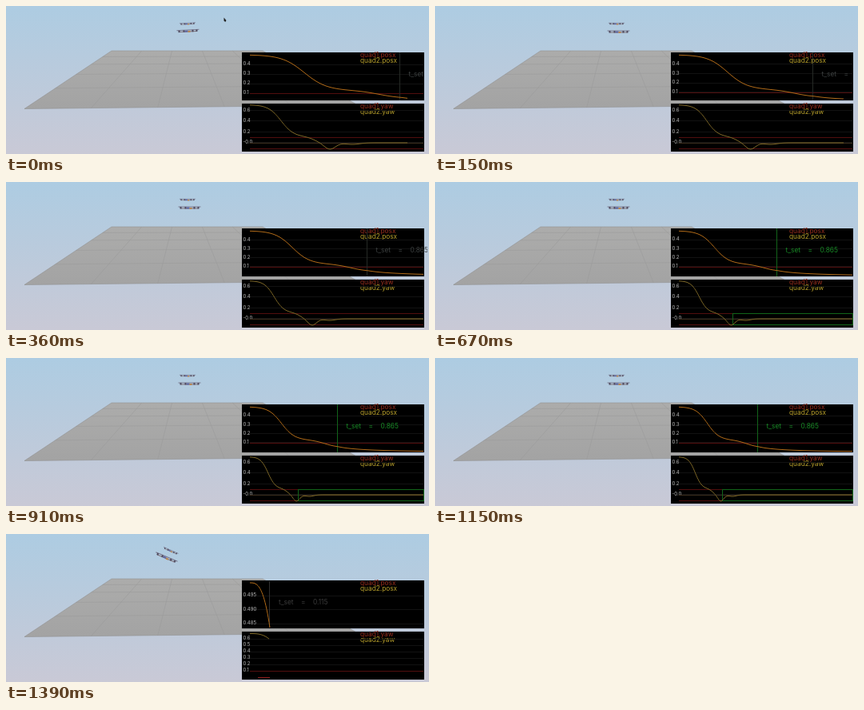
Recreate the animation shown at these times as an HTML page with a canvas. Size 529 px wide and 185 px high, loop 1.51 s.

```html
<!DOCTYPE html>
<html lang="en">
<head>
<meta charset="utf-8">
<style>
html, body { margin: 0; width: 100%; height: 100%; overflow: hidden; }
canvas { display: block; }
</style>
</head>
<body>
<canvas id="stage" width="529" height="185"></canvas>
<script>
const ctx = document.getElementById('stage').getContext('2d');
const LOOP = 1510, RESET = 1390, LEFT = 305, RIGHT = 522;
const STEPS = [0, 120, 150, 360, 670, 910, 1150, RESET];
const GREEN = '#12641a', RED = '#520e0e', ORANGE = '#b06a18', OLIVE = '#7c6626';

const drop = (u, center, width) => 1 / (1 + Math.exp((u - center) / width));
const bump = (u, center, width) => Math.exp(-(((u - center) / width) ** 2));

// Position falls in two steps and a slow tail; yaw overshoots zero twice
const position = u => .37 * drop(u, 68, 14) + .085 * drop(u, 162, 14)
  + .045 * Math.exp(-Math.max(0, u - 190) / 80);
const yaw = u => .6 * drop(u, 39, 8) + .11 * drop(u, 80, 5)
  - .12 * bump(u, 100, 10) - .03 * bump(u, 128, 13);

function trace(...points) {
  ctx.beginPath();
  points.forEach(p => ctx.lineTo(...p));
}

function line(color, x1, y1, x2, y2, width = 1) {
  ctx.strokeStyle = color;
  ctx.lineWidth = width;
  trace([x1, y1], [x2, y2]);
  ctx.stroke();
}

const across = (y, color) => line(color, LEFT, y, RIGHT, y);

function plot(color, end, yAt) {
  ctx.strokeStyle = color;
  ctx.lineWidth = 1;
  ctx.beginPath();
  for (let x = LEFT; x <= end; x++) ctx.lineTo(x, yAt(x));
  ctx.stroke();
}

function text(str, x, y, color, size = 8.3) {
  ctx.font = `${size}px Inter, sans-serif`;
  ctx.textBaseline = 'middle';
  ctx.fillStyle = color;
  ctx.fillText(str, x, y);
}

function gradient(y1, y2, from, to) {
  const fill = ctx.createLinearGradient(0, y1, 0, y2);
  fill.addColorStop(0, from);
  fill.addColorStop(1, to);
  return fill;
}

function scene() {
  ctx.fillStyle = gradient(0, 185, '#adcce2', '#c9c9d6');
  ctx.fillRect(0, 0, 529, 185);

  ctx.fillStyle = gradient(56, 128, '#acacab', '#a3a3a3');
  trace([132, 56], [321, 56], [440, 124], [23, 128.5]);
  ctx.fill();
  for (let i = 0; i <= 5; i++) {
    const s = i / 5, depth = s / (s + 2.2 * (1 - s));
    const shade = i % 5 ? '#9a9a9a' : '#909090';
    line(shade, 132 + 189 * s, 56, 23 + 417 * s, 128.5 - 4.5 * s, .6);
    line(shade, 132 - 109 * depth, 56 + 72.5 * depth, 321 + 119 * depth, 56 + 68 * depth, .6);
  }
}

function drone(x, y, angle, size) {
  ctx.save();
  ctx.translate(x, y);
  ctx.rotate(angle * Math.PI / 180);
  ctx.scale(size, size);
  line('#77738a', -14, -1, 14, -1, .9);
  line('#80727a', -11, 1, 11, 1, 1);
  ctx.fillStyle = '#514c60';
  for (const rotor of [-11, -5, 6, 11]) ctx.fillRect(rotor - 1, -1, 2, 2.5);
  ctx.fillStyle = '#5f68a4';
  ctx.fillRect(-4, -.5, 4, 2);
  ctx.fillStyle = '#b98650';
  ctx.fillRect(0, 0, 3, 2);
  ctx.restore();
}

function cursor() {
  ctx.fillStyle = '#222';
  trace([272.5, 14.5], [275.5, 18], [274.3, 20], [272.5, 18.5]);
  ctx.fill();
}

function panels() {
  ctx.fillStyle = '#000';
  ctx.fillRect(295, 58, 228, 60);
  ctx.fillRect(295, 122, 228, 60);
  ['posx', 'yaw'].forEach((name, i) => {
    const y = 62 + i * 63.5;
    text('quad1.' + name, 443, y, '#942c1c');
    text('quad2.' + name, 443, y + 6.7, '#b8a02c');
  });
}

function ticks(count, first, step, digits, y, gap) {
  for (let i = 0; i < count; i++) {
    across(Math.round(y + i * gap) + .5, '#121212');
    text((first - i * step).toFixed(digits), 296.5, y + i * gap, '#bdbdbd', 6);
  }
}

function settleTime(x, value, color) {
  text('t_set', x, 86, color);
  text('=', x + 28, 86, color);
  text(value, x + 43, 86, color);
}

function startPlots() {
  const rise = x => ((x - LEFT) / 25) ** 3;
  ticks(3, .495, .005, 3, 76.5, 17.5);
  ticks(6, .6, .1, 1, 130.5, 8);
  line('#303030', 329.5, 59, 329.5, 117);
  across(171.5, RED);
  line('#901c1c', 315, 179.5, 330, 179.5);
  plot(ORANGE, 330, x => 61 + 56 * rise(x));
  plot(OLIVE, 329, x => 124.5 + 7.5 * rise(x));
  settleTime(341, '0.115', '#3c3c3c');
}

function runPlots(t) {
  const scale = 1 / (1 + .00079 * t);
  const unit = Math.max(112, 120 - t * .022);
  const settled = t >= 670;
  const toX = u => LEFT + u * scale;
  const toU = x => (x - LEFT) / scale;
  const posY = v => 61 + (.5 - v) * unit;
  const end = Math.min(RIGHT, toX(197 + .228 * t));
  const mark = Math.round(toX(187)) + .5;
  const boxX = Math.round(toX(103)) + .5;

  ticks(4, .4, .1, 1, posY(.4) - .5, unit / 10);
  ticks(4, .6, .2, 1, 130, 13.4);
  across(Math.round(posY(.1)) + .5, RED);
  across(164.5, RED);
  across(178.5, RED);
  across(171.5, '#3a2c1c');
  line(settled ? GREEN : '#262a26', mark, 58, mark, 118);
  if (settled) {
    ctx.strokeStyle = GREEN;
    ctx.strokeRect(boxX, 164.5, RIGHT + .5 - boxX, 14);
  }
  plot(ORANGE, end, x => posY(position(toU(x))));
  plot(OLIVE, end, x => 171 - 67 * yaw(toU(x)));
  settleTime(mark + 11, '0.865', settled ? '#188a26' : '#3c4040');
}

function draw(now) {
  const time = now % LOOP;
  const t = STEPS.findLast(s => s <= time) ?? 0;
  const first = t < 120;
  scene();
  if (t === RESET) {
    drone(206, 21, 24, .72);
    drone(200.5, 29.5, 23, 1.05);
  } else {
    const tilt = first ? -3 : 0;
    drone(227, 22, tilt, .72);
    drone(first ? 227.5 : 229.5, first ? 31 : 32, tilt, 1);
  }
  if (first) cursor();
  ctx.save();
  ctx.beginPath();
  ctx.rect(0, 0, 527, 185);
  ctx.clip();
  panels();
  if (t === RESET) startPlots();
  else runPlots(t);
  ctx.restore();
  requestAnimationFrame(draw);
}
requestAnimationFrame(draw);
</script>
</body>
</html>
```
